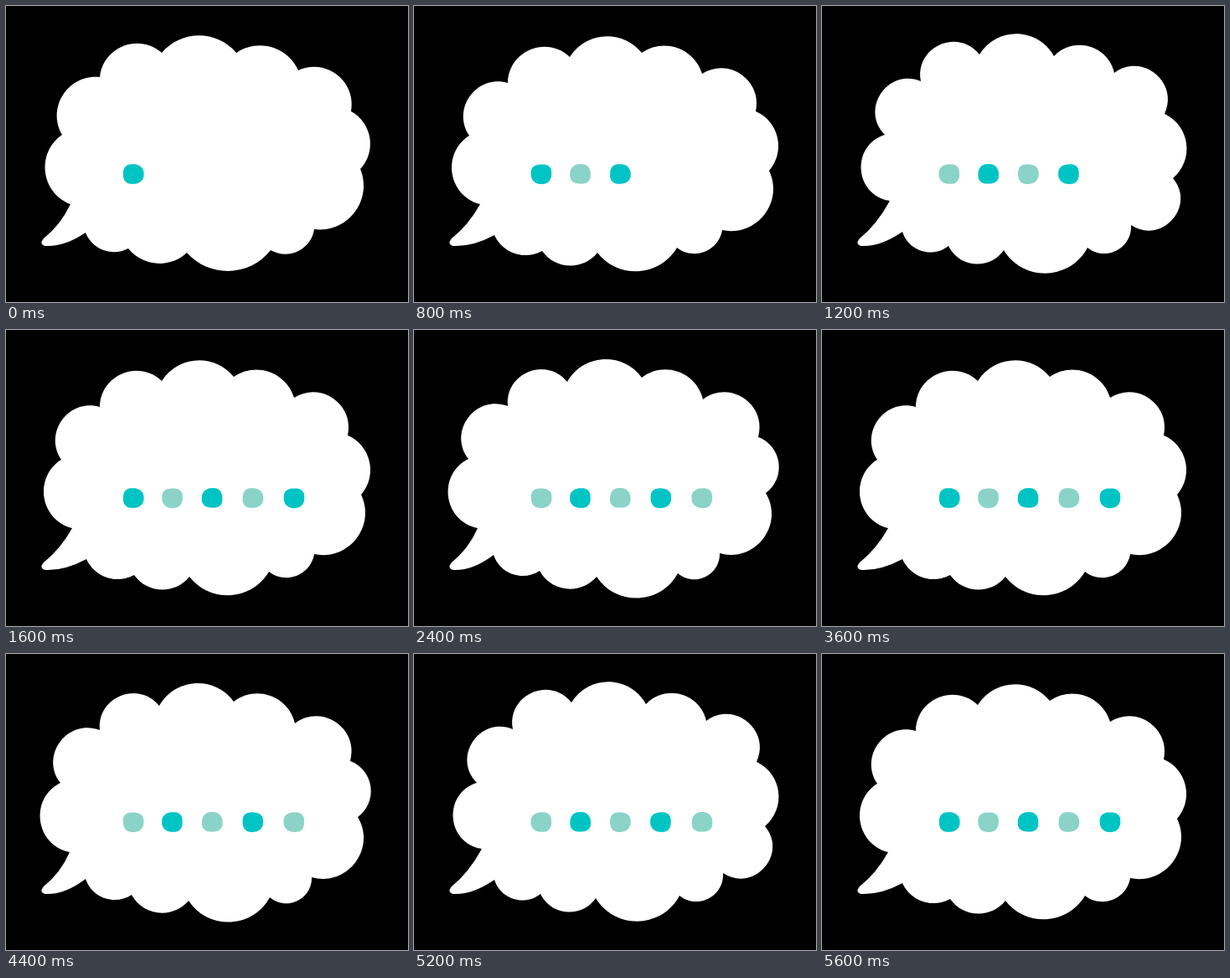
An HTML page with a canvas that plays this animation: 480 px wide and 354 px high, repeating every 6 s.

```html
<!DOCTYPE html>
<html lang="en">
<head>
<meta charset="utf-8">
<title>Typing bubble</title>
<style>
html, body { margin: 0; width: 100%; height: 100%; overflow: hidden; background: #000; }
canvas { display: block; }
</style>
</head>
<body>
<canvas id="stage" width="480" height="354"></canvas>
<script>
const ctx = document.getElementById('stage').getContext('2d');
const STEP = 400, STEPS = 15, DOTS = 5;
const TEAL = '#00c4c4', MINT = '#8bd3c7';

// Height of each lobe above its chord, clockwise from the left.
const BULGE = [28, 28, 27, 23, 20, 27, 19, 29, 17, 26, 17, 13.5];

// Notches between the lobes; plump scales every lobe of the pose.
const round = {
  plump: 0.9,
  notches: [[77,237], [67,154], [112,85], [186,56], [275,56], [349,77], [412,126],
    [423,195], [368,267], [316,292], [216,295], [146,290], [95,271]]
};
const wide = {
  plump: 0.97,
  notches: [[79,237], [66,155], [112,92], [186,61], [272,56], [344,81], [408,126],
    [424,197], [368,268], [314,289], [219,295], [153,293], [96,274]]
};
const full = {
  plump: 1.06,
  notches: [[76,237], [65,154], [112,91], [183,62], [272,57], [345,83], [411,128],
    [420,195], [365,267], [315,291], [218,295], [150,288], [95,269]]
};
const tall = {
  plump: 1.12,
  notches: [[81,233], [75,154], [118,90], [188,58], [277,60], [349,80], [409,129],
    [419,206], [369,262], [317,289], [217,292], [151,287], [96,270]]
};
const cycle = [round, full, wide, tall, wide];

// Circular arc of the given height, bulging to the left of the path.
function lobe([x0, y0], [x1, y1], height) {
  const dx = x1 - x0, dy = y1 - y0;
  const ratio = height / Math.hypot(dx, dy);
  const along = (1 - 4 * ratio * ratio) / 3;
  const out = 4 / 3 * ratio;
  ctx.bezierCurveTo(
    x0 + dx * along + dy * out, y0 + dy * along - dx * out,
    x1 - dx * along + dy * out, y1 - dy * along - dx * out,
    x1, y1);
}

function drawBubble({ notches, plump }) {
  ctx.fillStyle = '#fff';
  ctx.beginPath();
  ctx.moveTo(...notches[0]);
  BULGE.forEach((height, i) => lobe(notches[i], notches[i + 1], height * plump));
  // Tail
  ctx.quadraticCurveTo(70, 288, 47, 287);
  ctx.quadraticCurveTo(39, 285, 45, 278);
  ctx.quadraticCurveTo(65, 262, ...notches[0]);
  ctx.fill();
}

// Rounded square with a slightly uneven edge.
function drawDot(x, y, color, seed) {
  const soft = v => Math.sign(v) * Math.abs(v) ** 0.83;
  ctx.fillStyle = color;
  ctx.beginPath();
  for (let i = 0; i < 60; i++) {
    const a = i / 60 * Math.PI * 2;
    const k = 1 + 0.02 * Math.cos(3 * a + seed);
    ctx.lineTo(x + 12.3 * k * soft(Math.cos(a)), y + 11.8 * k * soft(Math.sin(a)));
  }
  ctx.fill();
}

function draw(ms) {
  const step = Math.floor(ms / STEP) % STEPS;
  const beat = step % cycle.length;
  ctx.fillStyle = '#000';
  ctx.fillRect(0, 0, 480, 354);
  drawBubble(cycle[beat]);
  for (let i = 0; i < Math.min(step + 1, DOTS); i++) {
    const x = 152 + 46.2 * i + 0.45 * i * i;
    drawDot(x, 201, (i + beat) % 2 ? MINT : TEAL, i * 2 + beat % 4);
  }
}

const start = performance.now();
function tick() {
  draw(performance.now() - start);
  requestAnimationFrame(tick);
}
tick();
</script>
</body>
</html>
```
